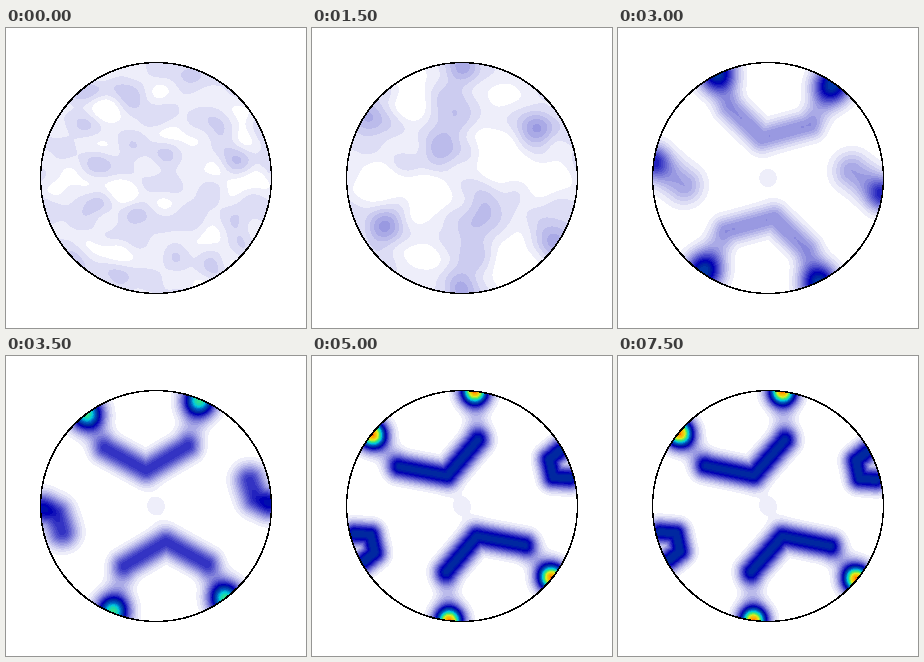
Recreate the animation shown at these times as a matplotlib script. Size 300 by 300 pixels, loop 8 s.

```python
import numpy as np
import matplotlib.pyplot as plt
from matplotlib.animation import FuncAnimation
from matplotlib.colors import to_rgb
from matplotlib.patches import Circle

SIZE, DPI, STEPS, STEP_MS = 300, 100, 16, 500
MID, RADIUS, TOP = 150 + 150j, 115.5, 40

# Slow stage: start, end, height and width of maxima and minima.
# Every feature is repeated by the two-fold axis in the centre.
SWELLS = [(230 + 106j, 222 + 91j, 4.6, 12), (60 + 82j, 46 + 102j, 3.5, 13),
          (165 + 36j, 124 + 44j, 3.4, 12), (148 + 68j, 138 + 70j, 1.8, 12),
          (148 + 98j, 118 + 106j, 1.7, 15), (132 + 124j, 124 + 126j, 2.2, 12),
          (104 + 58j, 92 + 72j, -2.5, 16), (186 + 132j, 182 + 125j, -3, 17),
          (235 + 150j, 226 + 133j, -2.6, 15), (186 + 70j, 195 + 48j, -1.6, 15)]

# Sharp stage: a bent band between two poles and a small hook at the side.
BAND = [(99 + 45j, 65 + 73j), (112 + 79j, 90 + 107j), (144 + 110j, 137 + 119j),
        (192 + 97j, 170 + 85j), (214 + 57j, 170 + 36j)]
HOOK = [(234 + 143j, 251 + 101j), (246 + 152j, 240 + 109j),
        (254 + 158j, 243 + 127j), (264 + 166j, 259 + 129j)]

axis = np.arange(0, SIZE + 1, 1.5)
GRID = axis[None, :] + 1j * axis[:, None]


def mix(a, b, u):
    return a + (b - a) * u


def glide(a, b, u):
    """Move from a to b along a spiral around the centre."""
    a, b = a - MID, b - MID
    return MID + a * (b / a) ** u


def bump(z, height, width):
    return height * np.exp(-np.abs(GRID - z) ** 2 / (2 * width ** 2))


def tube(path, height, width):
    """Rounded ridge along a polyline."""
    dist = np.full(GRID.shape, np.inf)
    for a, b in zip(path, path[1:]):
        t = np.clip(((GRID - a) / (b - a)).real, 0, 1)
        dist = np.minimum(dist, np.abs(GRID - a - t * (b - a)))
    return height * np.exp(-dist ** 2 / (2 * width ** 2))


def two_fold(f):
    return f + f[::-1, ::-1]


def ripples(count=60):
    """Seeded noise of unit variance made of plane waves."""
    rng = np.random.default_rng(12)
    f = np.zeros(GRID.shape)
    for _ in range(count):
        wave = np.exp(1j * rng.uniform(0, 2 * np.pi)) * 2 * np.pi / rng.uniform(30, 65)
        f += np.cos((GRID * wave).real + rng.uniform(0, 2 * np.pi))
    return f * np.sqrt(2 / count)


NOISE = ripples()


def weak(k):
    u = max(0, (k - 2) / 3)
    gain = np.interp(k, [0, 2, 5], [0.12, 0.95, 1.15])
    rough = np.interp(k, [0, 2, 5], [0.72, 0.4, 0.32])
    f = sum(bump(glide(a, b, u), h, w) for a, b, h, w in SWELLS)
    return 1.9 + gain * two_fold(f) + rough * NOISE


def strong(u, turn):
    spin = np.exp(-1j * np.radians(turn))

    def place(keys):
        return [MID + (glide(a, b, u) - MID) * spin for a, b in keys]

    band, hook = place(BAND), place(HOOK)
    f = tube(band, mix(4, 3.5, u), mix(10, 8, u))
    f += tube(band[1:-1], mix(3, 15, u), mix(9, 8, u))
    f += tube(hook, mix(6, 19, u), mix(13, 7.5, u))
    f += bump(hook[-1], mix(8, 0, u), 10)
    for pole in (band[0], band[-1]):
        f += bump(pole, mix(16, 36, u), mix(12.5, 9.5, u))
    return two_fold(f + bump(MID, 0.7, 10))


def density(k):
    if k < 6:
        return weak(k)
    turn = np.interp(k, [8, 9, 10, 13, 15], [0, 2.4, 3.6, 2.8, 2.7])
    return strong(min((k - 6) / 2, 1), turn)


def palette():
    stops = [0, 15, 18, 22, 26, 30, 34, 38, TOP]
    shades = ["#ffffff", "#0000b4", "#0028a0", "#005abe", "#00c8dc",
              "#3ce678", "#dcf01e", "#ffaa00", "#ff3c00"]
    rgb = np.array([to_rgb(s) for s in shades])
    n = np.arange(TOP + 1)
    return np.column_stack([np.interp(n, stops, c) for c in rgb.T])


COLORS = palette()
LEVELS = np.arange(1, TOP + 1)

fig = plt.figure(figsize=(SIZE / DPI, SIZE / DPI), dpi=DPI, facecolor="white")
ax = fig.add_axes([0, 0, 1, 1])


def draw(k):
    ax.clear()
    ax.set(xlim=(0, SIZE), ylim=(SIZE, 0))
    ax.axis("off")
    rim = Circle((MID.real, MID.imag), RADIUS, fill=False, ec="black", lw=0.3,
                 antialiased=False, zorder=3)
    ax.add_patch(rim)
    fill = ax.contourf(axis, axis, density(k), levels=LEVELS, colors=COLORS, extend="both")
    fill.set_clip_path(rim)
    return [fill, rim]


anim = FuncAnimation(fig, draw, frames=STEPS, interval=STEP_MS, init_func=lambda: [],
                     repeat=True, repeat_delay=0)
plt.show()
```
